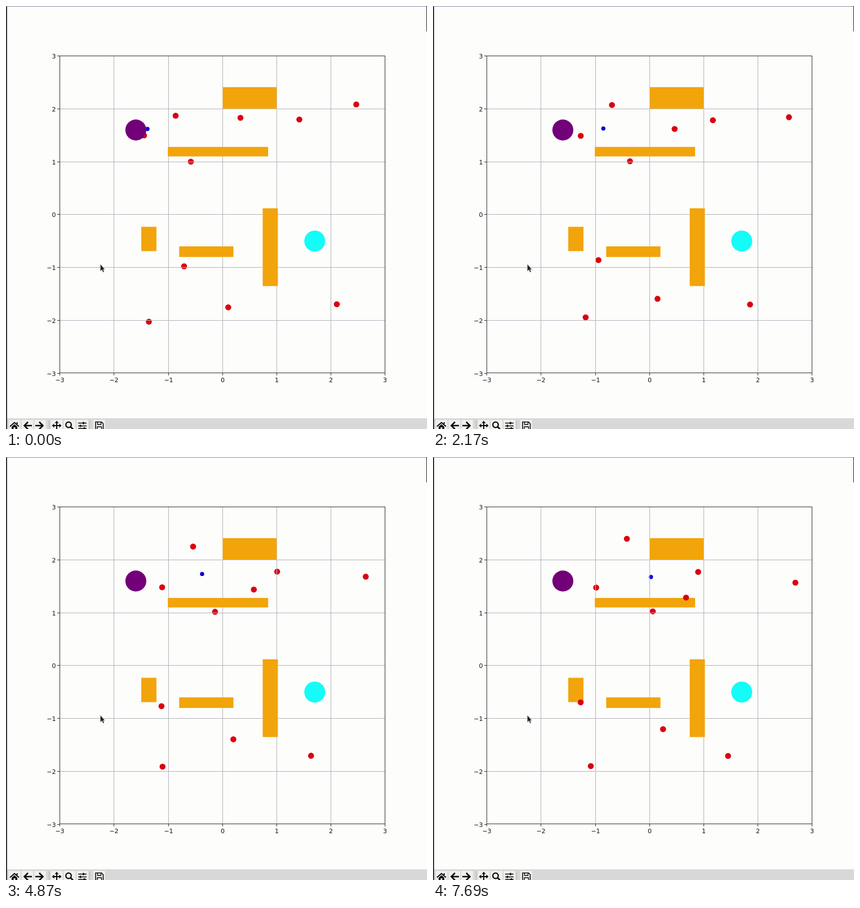
An HTML page for the animation above (8000 ms loop, 747 by 750 pixels).

```html
<!DOCTYPE html>
<html lang="en">
<head>
<meta charset="utf-8">
<title>Path planning plot</title>
<style>
  html, body { margin: 0; width: 100%; height: 100%; overflow: hidden; background: #fdfdfc; }
  svg { display: block; width: 747px; height: 750px; }
  text { font: 11px "DejaVu Sans", sans-serif; fill: #111; }
  .grid { stroke: #b4b4bb; stroke-width: 1; }
  .axis { stroke: #333; stroke-width: 1; fill: none; }
  .icon { fill: none; stroke: #0a0a0a; stroke-width: 2.6; }
</style>
</head>
<body>
<svg viewBox="0 0 747 750">
  <defs>
    <g id="walls"></g>
    <mask id="open" maskUnits="userSpaceOnUse" x="0" y="0" width="747" height="750">
      <rect width="747" height="750" fill="#fff"/>
      <use href="#walls" fill="#000"/>
    </mask>
  </defs>
  <rect width="747" height="750" fill="#fdfdfc"/>
  <use href="#walls" fill="#f2a40b"/>
  <g id="dots"></g>
  <g id="places"></g>
  <g id="grid" mask="url(#open)"></g>
  <g id="axes"></g>

  <rect y="731" width="747" height="19" fill="#d8d8d8"/>
  <g id="buttons" fill="#f0f0ee"></g>
  <path d="M76.5 735V750M148.5 735V750" stroke="#b4b4b4"/>
  <g class="icon">
    <path d="M7 745.5L15 738.5L23 745.5M19.8 738V741" stroke-width="2"/>
    <path d="M10 746L15 741.5L20 746V750H16.5V747H13.5V750H10Z" fill="#0a0a0a" stroke="none"/>
    <path d="M46 744H33M39 737.5L32.5 744L39 750.5"/>
    <path d="M52 744H65M59 737.5L65.5 744L59 750.5"/>
    <path d="M83 744H97M90 738V750" stroke-width="2"/>
    <path d="M90 735.5L93.5 739.5H86.5ZM81.5 744L85.5 740.5V747.5ZM98.5 744L94.5 740.5V747.5Z" fill="#0a0a0a" stroke="none"/>
    <circle cx="111" cy="742.5" r="4.8" stroke-width="2.3"/>
    <path d="M114.5 746L119 750.5"/>
    <path d="M128 739.5H143M128 744.5H143M128 749H143" stroke-width="1.5"/>
    <path d="M137.5 737.5V741.5M132 742.5V746.5M139 747V750" stroke-width="2.5"/>
    <path d="M159 750V737.5H169.5L172.5 740.5V750" stroke-width="1.6"/>
    <path d="M162.5 737.5V742H168.5V737.5M162 750V746H169.5V750" stroke-width="1.4"/>
  </g>

  <rect width="2" height="750" fill="#36363a"/>
  <path d="M0 .5H747" stroke="#8c8ca6"/>
  <rect x="746" width="1" height="45" fill="#222"/>
  <path d="M167.5 458V470L170.2 467.6L172.2 472L174 471.2L172.2 467H175.2Z" fill="#222" stroke="#aaa" stroke-width=".6"/>
</svg>
<script>
const LOOP = 8000;
const $ = id => document.getElementById(id);

function add(parent, tag, attrs, text) {
  const el = document.createElementNS("http://www.w3.org/2000/svg", tag);
  for (const k in attrs) el.setAttribute(k, attrs[k]);
  if (text !== undefined) el.textContent = text;
  return parent.appendChild(el);
}

// plot units to pixels
const UX = 96.2, UY = 93.8;
const px = x => 384.3 + x * UX;
const py = y => 369.9 - y * UY;
const snap = v => Math.floor(v) + .5;

function wall(x, y, w, h) {
  add($("walls"), "rect", { x: px(x), y: py(y + h), width: w * UX, height: h * UY });
}
wall(0, 2, 1, .41);
wall(-1.01, 1.1, 1.85, .18);
wall(-1.5, -.69, .28, .46);
wall(-.8, -.8, 1, .2);
wall(.74, -1.35, .28, 1.47);

add($("places"), "circle", { cx: px(-1.6), cy: py(1.6), r: 18.6, fill: "#720078" });
add($("places"), "circle", { cx: px(1.7), cy: py(-.5), r: 18.6, fill: "#13fcf8" });

for (let n = -3; n <= 3; n++) {
  const x = snap(px(n)), y = snap(py(n));
  const label = String(n).replace("-", "\u2212");
  if (Math.abs(n) < 3) add($("grid"), "path", { class: "grid", d: `M${x} 88V651M95 ${y}H672` });
  add($("axes"), "path", { class: "axis", d: `M${x} 651v4M95 ${y}h-4` });
  add($("axes"), "text", { x, y: 667, "text-anchor": "middle" }, label);
  add($("axes"), "text", { x: 88.5, y: y + 4, "text-anchor": "end" }, label);
}
add($("axes"), "rect", { class: "axis", x: 95.5, y: 88.5, width: 577, height: 562 });

// three groups of tool buttons
for (const [x, count] of [[5, 3], [80, 3], [155, 1]])
  for (let i = 0; i < count; i++)
    add($("buttons"), "rect", { x: x + i * 22.7, y: 734, width: 20.5, height: 16 });

// straight run from (x0, y0) to (x1, y1); half = share covered at half progress
const dots = [];
function dot(x0, y0, x1, y1, half = .5, look = { r: 5.3, fill: "#da0010" }, bend = () => 0) {
  const el = add($("dots"), "circle", look);
  dots.push(p => {
    const k = p < .5 ? p * 2 * half : half + (p - .5) * 2 * (1 - half);
    el.setAttribute("cx", x0 + (x1 - x0) * k);
    el.setAttribute("cy", y0 + (y1 - y0) * k + bend(k));
  });
}
dot(245, 229.5, 289.5, 231.5);
dot(301, 194.5, 344, 145);
dot(416, 198.3, 449, 249.3);
dot(520.5, 201.3, 470.5, 203.7, .62);
dot(621.5, 174.5, 643, 222.7, .61);
dot(328, 276, 390, 273.7, .45);
dot(316, 461.5, 262, 435, .54);
dot(394.3, 534.3, 408.2, 482.5, .38);
dot(587, 528.7, 523.5, 530);
dot(253.5, 559.7, 280, 548, .85);
dot(251, 218, 386.7, 212.7, .49, { r: 3.7, fill: "#0a00d0" },
  k => 5 * Math.sin(2 * Math.PI * k) - 2.5 * Math.sin(Math.PI * k));

// pace of the simulation: time, progress reached, updates on the way
const pace = [
  [0, 0, 1], [1160, .18, 16], [2170, .385, 10], [3480, .5, 3],
  [4870, .72, 10], [6000, .83, 4], [7690, 1, 7]
];

function progress(time) {
  const i = pace.findIndex(key => key[0] > time);
  if (i < 0) return 1;
  const [t0, p0] = pace[i - 1], [t1, p1, updates] = pace[i];
  const step = Math.floor((time - t0) / (t1 - t0) * updates);
  return p0 + (p1 - p0) * step / updates;
}

function draw(time) {
  const p = progress(time);
  for (const move of dots) move(p);
}

const begin = performance.now();
function tick() {
  draw(Math.max(0, performance.now() - begin) % LOOP);
  requestAnimationFrame(tick);
}
draw(0);
requestAnimationFrame(tick);
</script>
</body>
</html>
```
